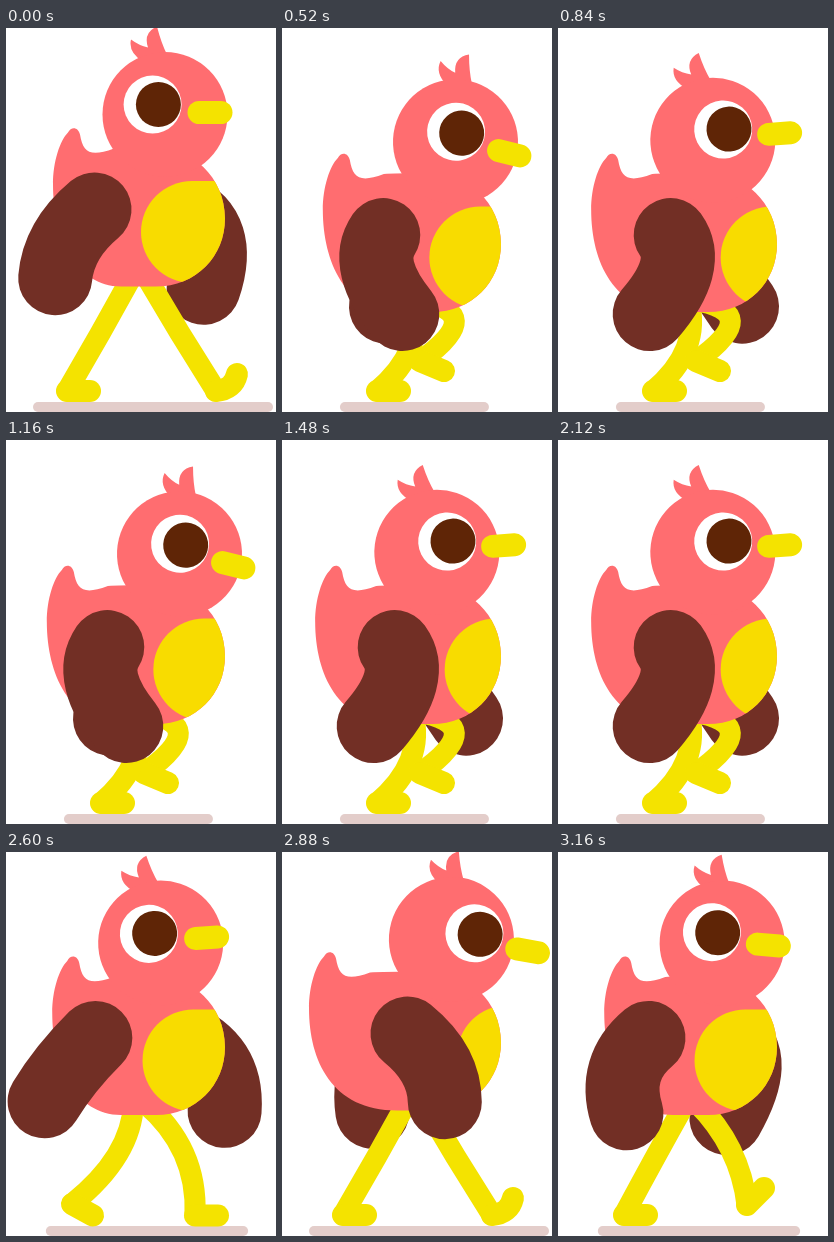
Write an HTML page with a canvas that moves like this. It is 270 px wide and 384 px high and loops after 3.2 s.

```html
<!DOCTYPE html>
<html lang="en">
<head>
<meta charset="utf-8">
<title>Walking bird</title>
<style>
  html, body { margin: 0; width: 100%; height: 100%; overflow: hidden; background: #fff; }
  canvas { display: block; width: 270px; height: 384px; }
</style>
</head>
<body>
<canvas id="stage"></canvas>
<script>
const W = 270, H = 384, STEP = 40, STEPS = 16;
const PINK = '#ff6d70', BROWN = '#722f25', BELLY = '#f8dc00', YELLOW = '#f4e300',
      PUPIL = '#5f2506', SHADOW = '#e3cdca';

const canvas = document.getElementById('stage');
const ctx = canvas.getContext('2d');
const dpr = window.devicePixelRatio || 1;
canvas.width = W * dpr;
canvas.height = H * dpr;

// Leg poses over one cycle: step, knee x y, heel x y, toe x y, toe curl
const POSES = [
  [0, 173, 305, 210, 363, 231, 346, 7],
  [1, 192, 296, 189, 364, 212, 364, 0],
  [5, 144, 322, 95, 363, 118, 363, 0],
  [7, 97, 305, 66, 363, 89, 363, 0],
  [8, 95, 305, 61, 363, 84, 363, 0],
  [9, 126, 304, 66, 352, 87, 364, 0],
  [13, 208, 284, 138, 333, 162, 343, 0],
  [15, 182, 294, 189, 353, 206, 336, 0]
];

// Pose i, with its step unwrapped past the ends of the cycle
function pose(i) {
  const n = POSES.length, turn = Math.floor(i / n);
  const [step, ...values] = POSES[i - turn * n];
  return { step: step + turn * STEPS, values };
}

// Smooth periodic interpolation between the leg poses
function legAt(step) {
  let i = POSES.length - 1;
  while (POSES[i][0] > step) i--;
  const [a, b, c, d] = [-1, 0, 1, 2].map(k => pose(i + k));
  const span = c.step - b.step, u = (step - b.step) / span;
  return b.values.map((p, k) => {
    const q = c.values[k];
    const m = (q - a.values[k]) / (c.step - a.step) * span;
    const n = (d.values[k] - p) / (d.step - b.step) * span;
    return p + u * (m + u * (3 * (q - p) - 2 * m - n + u * (2 * (p - q) + m + n)));
  });
}

function stroke(path, color, width) {
  ctx.strokeStyle = color;
  ctx.lineWidth = width;
  ctx.lineCap = ctx.lineJoin = 'round';
  ctx.stroke(new Path2D(path));
}

function fill(path, color) {
  ctx.fillStyle = color;
  ctx.fill(typeof path === 'string' ? new Path2D(path) : path);
}

function disc(x, y, r, color) {
  ctx.fillStyle = color;
  ctx.beginPath();
  ctx.arc(x, y, r, 0, 7);
  ctx.fill();
}

function pill(x, y, w, h, r, color) {
  ctx.fillStyle = color;
  ctx.beginPath();
  ctx.roundRect(x, y, w, h, r);
  ctx.fill();
}

function leg(step, base) {
  const [kx, ky, hx, heelY, tx, toeY, curl] = legAt(step);
  const hy = Math.min(heelY, 363.5), ty = Math.min(toeY, 363.5);
  const hip = 133 + 6 * Math.cos(step * Math.PI / 8);
  stroke(`M${hip},${base - 12} Q${kx},${ky} ${hx},${hy}`, YELLOW, 21);
  stroke(`M${hx},${hy} Q${(hx + tx) / 2 + curl},${(hy + ty) / 2 + curl} ${tx},${ty}`, YELLOW, 22);
}

function wing(sx, cx, cy, tx, ty) {
  stroke(`M${sx},-77 Q${cx},${cy} ${tx},${ty}`, BROWN, 74);
}

function torso(d) {
  return new Path2D(`M150,-139 C185,-139 219,-110 219,-68 C219,-30 190,0 150,0 L115,0
    C${60 + d},0 ${37 + d},-50 ${37 + d},-102
    C${37 + d},-125 ${44 + d},-146 ${52 + d},-154
    C${55 + d},-160 ${62 + d},-160 ${64 + d},-152
    C${67 + d},-134 ${74 + d},-129 ${98 + d},-138 Q${108 + d},-139 150,-139Z`);
}

function head(turn, tilt) {
  ctx.save();
  ctx.translate(159, -112);
  ctx.rotate(tilt * Math.PI / 180);
  ctx.translate(0, -60);
  fill('M-34,-75 Q-37,-62 -22,-53 L0,-58 L2,-60 Q-4,-72 -8,-88 Q-22,-82 -17,-67 Q-26,-69 -34,-75Z', PINK);
  disc(0, 0, 62.5, PINK);
  const eye = 4.6 + 17 * turn;
  disc(eye, -10, 29, '#fff');
  disc(eye + 5.8, -10, 22.5, PUPIL);
  pill(38.5 + 16 * turn, -13.5, 45, 23, 11.5, YELLOW);
  ctx.restore();
}

function draw(step) {
  const a = step * Math.PI / 8;
  const c = Math.cos(a), s = Math.sin(a), c2 = Math.cos(2 * a), s2 = Math.sin(2 * a);
  const base = 273.5 - 15 * c2;
  const inBody = paint => {
    ctx.save();
    ctx.translate(0, base);
    paint();
    ctx.restore();
  };

  ctx.setTransform(dpr, 0, 0, dpr, 0, 0);
  ctx.fillStyle = '#fff';
  ctx.fillRect(0, 0, W, H);

  const near = Math.abs(s), left = 27 + 33.5 * near;
  pill(left, 374, 267 - 65 * near - left, 10, 5, SHADOW);

  inBody(() => wing(155 + 18 * c, 150 + 68 * c + 25 * s, -58,
    144 + 53.6 * c + 65.5 * s, -4.75 + 6 * c2 - 5 * s2));

  leg(step, base);
  leg((step + 8) % STEPS, base);

  inBody(() => {
    const body = torso(10 * c);
    fill(body, PINK);
    ctx.save();
    ctx.clip(body);
    pill(155 - 20 * c, -105.5, 160, 102, 51, BELLY);
    ctx.restore();
    head(-c, 5 - 5 * c - 11.8 * s);
    wing(107 - 18.5 * c - 1.5 * s, 107.5 - 55 * c + 6 * s, -47,
      106 - 56.8 * c - 39 * s, -5.8 - 2.5 * c2 - 8.5 * s2);
  });
}

const start = performance.now();
function tick() {
  draw(Math.floor((performance.now() - start) / STEP) % STEPS);
  requestAnimationFrame(tick);
}
tick();
</script>
</body>
</html>
```
